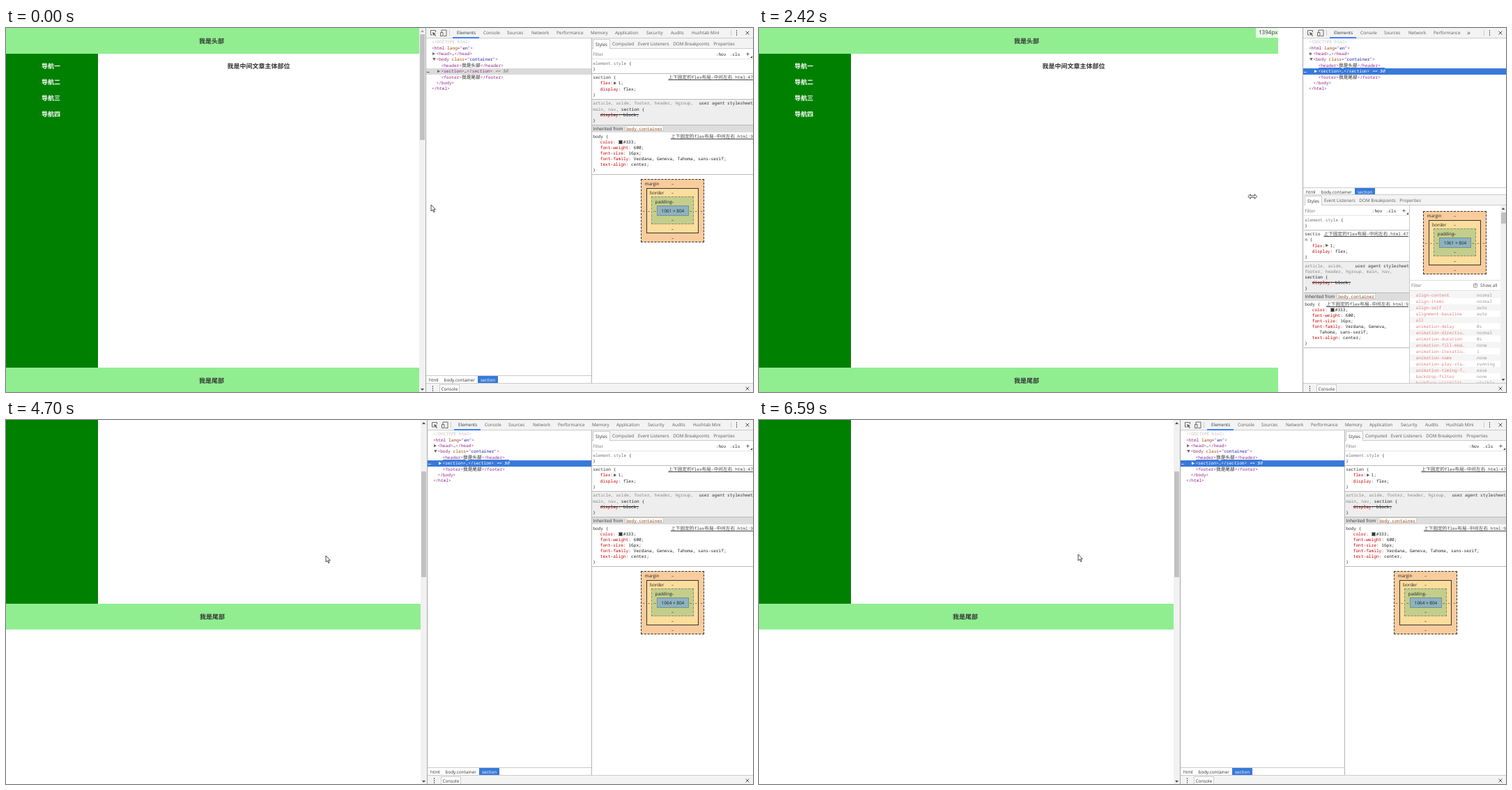
An HTML page that plays this animation: 1072 px wide and 523 px high, repeating every 7.14 s.

```html
<!DOCTYPE html>
<html lang="zh">
<head>
<meta charset="utf-8">
<title>flex layout</title>
<style>
html, body { margin: 0; width: 100%; height: 100%; overflow: hidden; background: #fff; }
* { box-sizing: border-box; }
p { margin: 0; }
#stage {
  position: relative; width: 1072px; height: 523px; overflow: hidden; background: #fff;
  text-rendering: geometricPrecision; white-space: pre;
  font: 6.35px "Open Sans", "Noto Sans", "Noto Sans CJK SC", sans-serif; color: #333;
}
#stage div, .t, svg { position: absolute; }
.t { line-height: 10px; margin-top: -5px; }
.mid { transform: translateX(-50%); }
.mono { font: 6.17px "Noto Sans Mono", "Noto Sans CJK SC", monospace; }
.c { font-size: 6.7px; line-height: 0; }

/* page */
#page { left: 0; top: 0; height: 523px; width: var(--clip); overflow: hidden; }
#view { left: 0; top: 0; height: 523px; width: var(--d); overflow: hidden; }
#doc { left: 0; right: 10px; top: 0; font: 600 9px/37px "Noto Sans CJK SC", "Noto Sans", sans-serif;
  text-align: center; transform: translateY(calc(var(--scroll) * -1)); }
.bar { left: 0; right: 0; height: 37px; padding-right: 3px; background: #90ee90; }
#nav { left: 0; top: 37px; width: 132px; height: 451px; padding: 6px 3px 0 0; background: green; color: #fff; line-height: 23px; }
#main { left: 132px; right: 0; top: 37px; line-height: 35px; }
.track { background: #f1f1f1; }
.thumb { background: #c1c1c1; }
.up, .down { width: 5px; height: 3px; background: #505050; clip-path: polygon(50% 0, 100% 100%, 0 100%); }
.down { clip-path: polygon(0 0, 100% 0, 50% 100%); }
#vbar { right: 1px; top: 0; width: 9px; height: 523px; }
#vbar .thumb { left: 1px; width: 7px; top: 9px; height: 152px; transform: translateY(calc(var(--scroll) * .2895)); }
#size { right: 0; top: 0; width: 68px; height: 14px; padding-left: 4px; background: rgba(255,255,255,.8);
  font-size: 8.05px; line-height: 14px; }

/* developer tools */
#tools { left: calc(var(--d) - 1px); top: 0; right: 0; bottom: 0; background: #fff; border-left: 1px solid #a8a8a8; overflow: hidden; }
#bar { left: 0; right: 0; top: 0; height: 15px; background: #f3f3f3; border-bottom: 1px solid #ccc; color: #5a5a5a; }
#line { left: 38px; width: 38px; top: 13px; height: 2px; background: #3e82f1; }
.sep { width: 1px; top: 3px; height: 8px; background: #ccc; }
#tree { left: 0; right: 232px; top: 16.1px; font-size: 6.15px; color: #222; }
.narrow #tree { right: 0; }
#tree p { position: relative; height: 8.43px; line-height: 8.43px; padding-left: var(--i); }
#tree .r::before, #tree .o::before { content: ""; position: absolute; left: calc(var(--i) - 5.5px); top: 1.7px;
  width: 4px; height: 4.6px; background: #6e6e6e; clip-path: polygon(0 0, 100% 50%, 0 100%); }
#tree .o::before { width: 4.8px; height: 4px; clip-path: polygon(0 0, 100% 0, 50% 100%); }
u { text-decoration: none; color: #92278a; }
.an { color: #994500; } .av { color: #1a1aa6; } .eq { color: #777; font-style: italic; }
#row { background: #dadada; }
.picked #row, .picked #row * { background: #3879d9; color: #fff; }
.picked #row.r::before { background: #fff; }
#row b { position: absolute; left: 1px; font-weight: 700; }
#crumbs { left: 0; right: 232px; top: 499px; height: 11px; border-top: 1px solid #ccc; background: #fff; }
.narrow #crumbs { top: 229px; right: 0; }
#crumbs .on { left: 74px; top: 0; width: 29px; height: 10px; background: #3879d9; }
#drawer { left: 0; right: 0; top: 510px; height: 13px; background: #f3f3f3; border-top: 1px solid #ccc; }
#drawer .tab { left: 19px; top: 1px; width: 29px; height: 12px; background: #fff; border: 1px solid #ccc; border-bottom: 0; }

/* styles */
#pane { left: 840px; top: 14px; right: 0; height: 496px; background: #fff; border-left: 1px solid #b4b4b4; overflow: hidden; }
.narrow #pane { left: var(--d); top: 239px; height: 271px; border-left-color: #fff; }
#tabs { left: -1px; right: 0; top: 0; height: 16px; padding: 2px 0 0 2px; display: flex; background: #f3f3f3;
  border: 1px solid #ccc; border-width: 1px 0; line-height: 12px; color: #5a5a5a; }
#tabs span { padding: 0 2.8px; }
#tabs .on { padding: 0 3px; margin-top: -1px; line-height: 13px; height: 14px; background: #fff; border: 1px solid #ccc; border-bottom: 0; color: #333; }
.narrow #computed, .wide #side { display: none; }
#rules { left: 0; right: 0; top: 16px; white-space: normal; }
.narrow #rules { right: 139px; bottom: 0; }
#filter { left: 0; right: 0; top: 0; height: 15px; border-bottom: 1px solid #e4e4e4; color: #777; }
#list { left: 0; right: 0; top: 15px; line-height: 8.2px; }
.rule { padding: 1.5px 0 1.8px 1.2px; border-bottom: .6px solid #bbb; }
.rule.ua { background: #eee; color: #888; }
.rule p { padding: 0 6px 0 21px; text-indent: -10.5px; color: #222; }
.rule s { color: #222; }
.rule em, s em { font-style: normal; color: #c80000; }
.from { float: right; margin-left: 4px; white-space: pre; color: #333; }
.from.a { text-decoration: underline; margin-right: 1px; color: #444; }
.wide .from.a { margin-right: 0; }
.brk { word-break: break-all; }
.dim { color: #777; }
.tri { display: inline-block; width: 4px; height: 4.4px; margin: 0 2.4px 0 1px; background: #555; clip-path: polygon(0 0, 100% 50%, 0 100%); }
.sw { display: inline-block; width: 6px; height: 6px; margin-right: 1.2px; background: #333; border: .5px solid #999; vertical-align: -1px; }
#inh { position: static !important; height: 10.2px; line-height: 10.2px; padding-left: 1.5px; background: #ddd; white-space: pre;
  font-family: "Open Sans", "Noto Sans", sans-serif; font-size: 6.35px; }
#inh span { display: inline-block; height: 8px; line-height: 7.6px; padding: 0 1px; margin-left: 1px; background: #fff; border: .5px solid #ccc; color: #994500; }

/* side column */
#side { left: 933px; right: 0; top: 255px; height: 255px; background: #fff; border-left: 1px solid #ccc; overflow: hidden; }
#find { left: 0; right: 0; top: 107px; height: 16px; border: 1px solid #ddd; border-width: 1px 0; color: #777; }
#check { left: 100px; top: 4px; width: 6px; height: 6px; border: .7px solid #999; border-radius: 1px; font: 700 5.5px/5px "DejaVu Sans", sans-serif; color: #333; }
#fonts { left: 0; right: 0; top: 181px; height: 14px; padding-left: 2px; background: #f3f3f3; border: 1px solid #ddd; line-height: 12px; }
#props { left: 0; right: 8px; top: 124px; color: #e28080; }
#props p { position: relative; height: 9px; line-height: 9px; padding-left: 8.5px; }
#props p:nth-child(odd) { background: #f5f5f5; }
#props span { position: absolute; left: 96px; color: #999; }
#sbar { right: 0; top: 0; width: 8px; height: 255px; }
.listed #fonts, .blank #props, .blank #sbar { display: none; }
.listed #find .sh { transform: translateX(-9px); }
#model { left: 911px; top: 217px; color: #222; }
.narrow #model { left: 958px; top: 263px; }
.narrow.listed #model { left: 953px; }
#model div { border: 1px dashed #333; }
#cursor { left: 0; top: 0; overflow: visible; }
</style>
</head>
<body>
<div id="stage">
  <div id="page"><div id="view">
    <div id="doc">
      <div class="bar" style="top:0">我是头部</div>
      <div id="nav">导航一<br>导航二<br>导航三<br>导航四</div>
      <div id="main">我是中间文章主体部位</div>
      <div class="bar" style="top:488px">我是尾部</div>
    </div>
    <div id="vbar" class="track">
      <div class="up" style="left:2px;top:3px"></div><div class="thumb"></div>
      <div class="down" style="left:2px;top:518px"></div>
    </div>
    <div id="size"></div>
  </div></div>

  <div id="tools">
    <div id="tree" class="mono"><p style="--i:8px;color:#c0c0c0">&lt;!DOCTYPE html&gt;</p><p style="--i:8px"><u>&lt;html <span class="an">lang</span>="<span class="av">en</span>"&gt;</u></p><p class="r" style="--i:14.5px"><u>&lt;head&gt;</u>…<u>&lt;/head&gt;</u></p><p class="o" style="--i:14.5px"><u>&lt;body <span class="an">class</span>="<span class="av">container</span>"&gt;</u></p><p style="--i:21.5px"><u>&lt;header&gt;</u><span class="c">我是头部</span><u>&lt;/header&gt;</u></p><p id="row" class="r" style="--i:21.5px"><b>…</b><u>&lt;section&gt;</u>…<u>&lt;/section&gt;</u><span class="eq"> == $0</span></p><p style="--i:21.5px"><u>&lt;footer&gt;</u><span class="c">我是尾部</span><u>&lt;/footer&gt;</u></p><p style="--i:14.5px"><u>&lt;/body&gt;</u></p><p style="--i:8px"><u>&lt;/html&gt;</u></p></div>
    <div id="bar">
      <svg style="left:5px;top:2px" width="26" height="11" fill="none" stroke="#5a5a5a" stroke-width=".9">
        <path d="M4 8H1.5V1.5H8.500V4"/><path d="M4 4l5 2-2 .8 2 2.300-.8.800-2-2.300-.9 1.600z" fill="#5a5a5a" stroke="none"/>
        <path d="M17 4V1h7v8.500h-4M15.500 4.500h3.500v5h-3.500z"/>
      </svg>
      <div class="sep" style="left:33px"></div><div id="line"></div>
    </div>
    <div id="crumbs"><div class="on"></div></div>
    <div id="drawer"><div class="tab"></div></div>
  </div>

  <div id="pane">
    <div id="tabs"><span class="on">Styles</span><span id="computed">Computed</span><span>Event Listeners</span><span>DOM Breakpoints</span><span>Properties</span></div>
    <div id="rules" class="mono">
      <div id="filter"></div>
      <div id="list">
        <section class="rule"><span class="dim">element.style</span> {<br>}</section>
        <section class="rule"><span class="from a"></span><span class="brk">section {</span><p><em>flex</em>:<span class="tri"></span>1;</p><p><em>display</em>: flex;</p>}</section>
        <section class="rule ua"><span class="from">user agent stylesheet</span>article, aside, footer, header, hgroup, main, nav, <span style="color:#222">section {</span><p><s><em>display</em>: block;</s></p><span style="color:#222">}</span></section>
        <div id="inh">Inherited from <span class="mono">body.container</span></div>
        <section class="rule" style="line-height:8.05px"><span class="from a"></span>body {<p><em>color</em>: <span class="sw"></span>#333;</p><p><em>font-weight</em>: 600;</p><p><em>font-size</em>: 16px;</p><p><em>font-family</em>: Verdana, Geneva, Tahoma, sans-serif;</p><p><em>text-align</em>: center;</p>}</section>
      </div>
    </div>
  </div>

  <div id="side">
    <div id="find"><div id="check" class="sh">✓</div></div>
    <div id="fonts">Rendered Fonts</div>
    <div id="props" class="mono"></div>
    <div id="sbar" class="track">
      <div class="up" style="left:1.5px;top:3px"></div><div class="thumb" style="left:1px;width:7px;top:10px;height:16px"></div>
      <div class="down" style="left:1.5px;top:249px"></div>
    </div>
  </div>
  <div id="model"></div>

  <svg id="cursor" width="1" height="1" fill="#fff" stroke="#222" stroke-width=".8" stroke-linejoin="round">
    <path id="arrow" d="M0 0V9L2.100 7.200 3.700 10.600 5.100 10 3.600 6.700H6.300Z"/>
    <path id="resize" d="M-6.500 0L-3 -3.300V-1.200H3V-3.300L6.500 0 3 3.300V1.200H-3V3.300Z"/>
  </svg>
</div>

<script>
const LOOP = 7140;
const $ = id => document.getElementById(id);
const stage = $('stage');

function add(parent, css, cls = '', tag = 'div', text = '') {
  const el = document.createElement(tag);
  el.style.cssText = css;
  el.className = cls;
  el.textContent = text;
  parent.append(el);
  return el;
}
const label = (parent, x, y, text, cls = '', css = '') =>
  add(parent, `left:${x}px;top:${y}px;${css}`, 't ' + cls, 'span', text);
const labelRight = (parent, r, y, text, cls, css = '') =>
  add(parent, `right:${r}px;top:${y}px;${css}`, 't ' + cls, 'span', text);

// toolbar
const names = ['Elements', 'Console', 'Sources', 'Network', 'Performance', 'Memory',
  'Application', 'Security', 'Audits', 'Hushtab Mini'];
const starts = [44, 82, 116, 151, 187, 236, 271, 316, 351, 381];
const tabs = names.map((n, i) => label($('bar'), starts[i], 7, n, '', i ? '' : 'color:#333'));
const more = label($('bar'), 0, 6, '»', '', 'font-size:10px');
add($('bar'), 'right:31px', 'sep');

function kebab(parent, css) {
  for (const y of [-3, 0, 3]) add(parent, css + `;margin-top:${y}px;width:1.4px;height:1.4px;background:#5a5a5a`);
}
function cross(parent, top) {
  parent.insertAdjacentHTML('beforeend', `<svg style="right:5px;top:${top}px" width="6" height="6"
    stroke="#555" stroke-width="1"><path d="M.5 .5L5.500 5.500M5.500 .5L.5 5.500"/></svg>`);
}
kebab($('bar'), 'right:23px;top:6.3px');
cross($('bar'), 4);
kebab($('drawer'), 'left:8.500px;top:6.3px');
cross($('drawer'), 4);
label($('drawer'), 21.5, 7.5, 'Console');

label($('crumbs'), 4, 5.5, 'html');
label($('crumbs'), 25.5, 5.5, 'body.container');
label($('crumbs'), 78, 5.5, 'section', '', 'color:#fff');

// filter rows
const ui = 'font-family:"Open Sans",sans-serif;font-size:6.35px';
label($('filter'), 1.2, 7.5, 'Filter', '', ui);
labelRight($('filter'), 38.5, 7.5, ':hov', '', 'color:#222;font-weight:500');
labelRight($('filter'), 18.5, 7.5, '.cls', '', 'color:#222;font-weight:500');
labelRight($('filter'), 4.5, 7, '+', '', 'color:#444;font-size:10px');
add($('filter'), 'right:1px;top:10px;width:3px;height:3px;background:#444;clip-path:polygon(100% 0,100% 100%,0 100%)');
label($('find'), 2, 7, 'Filter');
label($('find'), 110, 7, 'Show all', 'sh', 'color:#444');

document.querySelectorAll('.from.a').forEach((el, i) => {
  el.innerHTML = `上下固定的flex布局-中间左右.html:${i ? 9 : 47}`
    .replace(/[\u4e00-\u9fff]+/g, '<span class="c">$&</span>');
});

const props = `align-content normal,align-items normal,align-self auto,alignment-baseline auto,all ,
animation-delay 0s,animation-directio… normal,animation-duration 0s,animation-fill-mod… none,
animation-iteratio… 1,animation-name none,animation-play-sta… running,animation-timing-f… ease,
backdrop-filter none,backface-visibilit… visible`;
for (const item of props.split(',')) {
  const [name, value] = item.trim().split(' ');
  add(add($('props'), '', '', 'p', name), '', '', 'span', value || '');
}

// box model
const model = $('model');
const layer = (x, y, w, h, css) => add(model, `left:${x}px;top:${y}px;width:${w}px;height:${h}px;${css}`);
layer(0, 0, 91, 91, 'background:#f9cc9d');
layer(8, 13, 75, 65, 'background:#fddd9b;border-style:solid');
layer(15, 25, 61, 40, 'background:#c3ce8b;border-color:#888');
layer(23, 38, 46, 15, 'background:#8cb3bf;border:1px solid #7b8f96');
label(model, 5.5, 7, 'margin');
label(model, 13, 20, 'border');
label(model, 20.5, 33, 'padding');
const dims = label(model, 46, 45.5, '', 'mid');
for (const y of [7, 20, 33, 59, 72, 85]) label(model, 45.5, y, '–', 'mid');
for (const x of [4, 11.5, 20, 71.5, 79, 87]) label(model, x, 45.5, '–', 'mid');

// each move: [start, end, steps, target, easing power]
function track(t, v, moves) {
  for (const [a, b, n, to, p = 1] of moves) {
    const k = Math.floor((t - a + 4) / ((b - a) / (n - 1))) + 1;
    const u = (Math.min(n, Math.max(0, k)) / n) ** p;
    v += (to - v) * u * u * (3 - 2 * u);
  }
  return v;
}
const divider = [[870, 1570, 10, 714.3], [1650, 2040, 6, 822], [2110, 2960, 12, 605.4, 1.456]];
const mouseX = [[70, 240, 4, 604], [870, 1570, 10, 721.3], [1650, 2040, 6, 826],
  [2110, 2960, 12, 605.5, .741], [3130, 3510, 6, 459]];
const mouseY = [[70, 240, 4, 252], [870, 1570, 10, 251], [1650, 2040, 6, 244],
  [2110, 2960, 12, 240.5, .741], [3130, 3510, 6, 195]];
const wheel = [[3840, 3980, 3, 56], [4390, 4700, 5, 224, 1.1], [4940, 5470, 8, 616, .8],
  [5720, 5870, 3, 672], [6020, 6590, 8, 224]];

function draw(t) {
  const width = track(t, 603, divider), d = Math.round(width);
  const scroll = track(t, 0, wheel);
  const x = track(t, 610, mouseX) - (t >= 4940);
  const y = track(t, 254, mouseY) - (t >= 4940) - (t >= 6020);
  // while shrinking, the page is cropped before the tools catch up
  const clip = t >= 2106 && t < 2956 ? Math.min(d, Math.round((d + x) / 2)) : d;

  stage.style.setProperty('--d', d + 'px');
  stage.style.setProperty('--clip', clip + 'px');
  stage.style.setProperty('--scroll', Math.round(scroll) + 'px');
  stage.className = [d > 691 ? 'narrow' : 'wide', t >= 1646 ? 'listed' : 'blank', t >= 550 ? 'picked' : ''].join(' ');

  $('size').style.display = t >= 866 && t < 3836 ? '' : 'none';
  $('size').textContent = Math.round(width * 1.7856) + 'px × 936px';
  dims.textContent = (t >= 2956 ? 1064 : 1061) + ' × 804';
  document.querySelector('#vbar .up').style.background = scroll > 0 ? '#505050' : '#a3a3a3';

  const shown = d + 430 < 1040 ? tabs.length : starts.filter((s, i) => i && s + d < 1022).length;
  tabs.forEach((tab, i) => tab.style.display = i < shown ? '' : 'none');
  more.style.display = shown < tabs.length ? '' : 'none';
  more.style.left = starts[Math.min(shown, 9)] - 1 + 'px';

  const pointing = t < 170 || t >= 3200;
  $('arrow').style.display = pointing ? '' : 'none';
  $('resize').style.display = pointing ? 'none' : '';
  $('cursor').style.transform = `translate(${x}px,${y}px)`;
}

const t0 = performance.now();
function frame() {
  draw((performance.now() - t0) % LOOP);
  requestAnimationFrame(frame);
}
frame();
</script>
</body>
</html>
```
